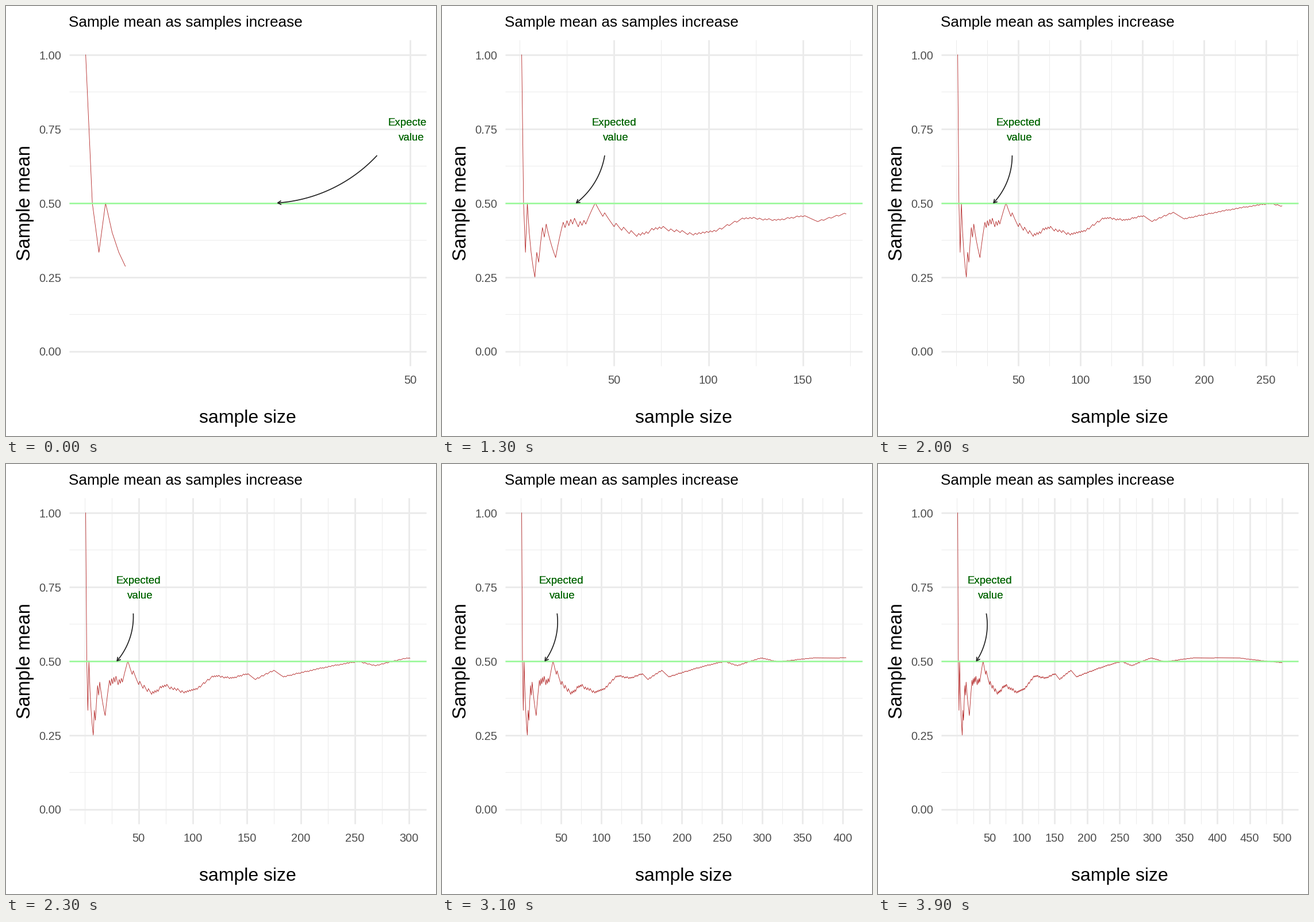
A matplotlib script that plays this animation: 748 by 748 pixels, repeating every 5 s.

```python
import matplotlib.pyplot as plt
import numpy as np
from matplotlib.animation import FuncAnimation
from matplotlib.collections import LineCollection
from matplotlib.patches import Rectangle

SIZE, DPI = 748, 64
PT = 72 / DPI  # points per pixel
LEFT, RIGHT, TOP, BOTTOM = 110, 731.2, 58.7, 626.3
X_FIRST, X_SPAN = 138.6, 564.5
STEPS, FRAMES, SAMPLES = 40, 50, 500

plt.rcParams["font.family"] = "Liberation Sans"

# Main turning points of the coin tosses: (tosses, heads)
TURNS = [(0, 0), (1, 1), (3, 1), (4, 2), (8, 2), (14, 6), (19, 6), (23, 10),
         (35, 15), (40, 20), (49, 21), (64, 25), (74, 31), (91, 36),
         (104, 42), (120, 54), (136, 60), (151, 69), (158, 69), (175, 82),
         (184, 82), (200, 92), (253, 126), (269, 130), (298, 152),
         (320, 159), (363, 185), (431, 220), (500, 247)]


def running_mean():
    """Whole heads spread evenly between turning points, per toss."""
    tosses = np.arange(1, SAMPLES + 1)
    heads = np.floor(np.interp(tosses, *np.transpose(TURNS)) + 0.5)
    return heads / tosses


def y_px(value):
    return 600.5 - 516 * np.asarray(value)


MEANS_PX = y_px(running_mean())

fig = plt.figure(figsize=(SIZE / DPI, SIZE / DPI), dpi=DPI, facecolor="white")
ax = fig.add_axes([0, 0, 1, 1])
ax.set_xlim(0, SIZE)
ax.set_ylim(SIZE, 0)
ax.axis("off")
panel = Rectangle((LEFT, TOP), RIGHT - LEFT, BOTTOM - TOP,
                  transform=ax.transData)


def label(x, y, text, size, color="black", **kw):
    kw.setdefault("ha", "center")
    return ax.text(x, y, text, size=size * PT, color=color, va="baseline",
                   rotation_mode="anchor", **kw)


def note(y, text):
    item = label(0, y, text, 18.6, "#006400", zorder=6)
    item.set_clip_on(True)
    item.set_clip_path(panel)
    return item


def stroke(color, width, zorder):
    return ax.plot([], [], color=color, lw=width * PT, zorder=zorder,
                   solid_capstyle="butt", solid_joinstyle="round")[0]


def grid(width, zorder):
    lines = LineCollection([], colors="#EBEBEB", linewidths=width * PT,
                           zorder=zorder)
    return ax.add_collection(lines, autolim=False)


def rows(values):
    return [[(LEFT, y), (RIGHT, y)] for y in y_px(values)]


def columns(xs):
    return [[(x, TOP), (x, BOTTOM)] for x in xs]


label(109.5, 36, "Sample mean as samples increase", 26.1, ha="left")
label(420.3, 725, "sample size", 32)
label(42.3, 342.3, "Sample mean", 32.5, rotation=90)
MAJOR_Y = np.arange(5) / 4
for value in MAJOR_Y:
    label(96, y_px(value) + 8, f"{value:.2f}", 20, "#4D4D4D", ha="right")

minor_grid, major_grid = grid(1, 1), grid(3, 2)
mean_line = stroke("#B22222", 0.85, 3)
expected_line = stroke("#98FB98", 2.5, 4)
expected_line.set_data([LEFT, RIGHT], [y_px(0.5)] * 2)
arrow, arrow_head = stroke("#222222", 1.7, 5), stroke("#222222", 1.7, 5)
ticks = [label(0, 657, str(n), 20, "#4D4D4D") for n in range(50, 501, 50)]
# Overprinting gives the note its heavier weight
upper_notes = [note(208, "Expected") for _ in range(2)]
lower_notes = [note(234, "value") for _ in range(2)]


def draw_arrow(start, end, bulge=0.19, barb=7):
    start, end = np.array(start), np.array(end)
    half = np.hypot(*(end - start)) / 2
    along = (end - start) / (2 * half)
    across = np.array([along[1], -along[0]])
    phi = 2 * np.arctan(bulge)
    a = np.linspace(-phi, phi, 40)[:, None]
    arc = (start + end) / 2 + half / np.sin(phi) * (
        along * np.sin(a) + across * (np.cos(a) - np.cos(phi)))
    arrow.set_data(*arc.T)
    back = across * np.sin(phi) - along * np.cos(phi)
    heading = np.arctan2(back[1], back[0])
    barbs = [end + barb * np.array([np.cos(t), np.sin(t)])
             for t in (heading - np.pi / 6, heading + np.pi / 6)]
    arrow_head.set_data(*np.transpose([barbs[0], end, barbs[1]]))


def update(frame):
    step = min(frame, STEPS - 1)
    count = min(int(1 + (SAMPLES - 1) / (STEPS - 1) * (step + 0.5)), SAMPLES)
    x_max = max(count, 50)

    def x_px(n):
        return X_FIRST + (np.asarray(n) - 1) * X_SPAN / (x_max - 1)

    edge = x_max + 0.05 * (x_max - 1)
    major = np.arange(50, min(edge, SAMPLES) + 1e-9, 50)
    minor = [0, *np.arange(25, edge, 50)] if len(major) > 1 else []
    major_grid.set_segments(rows(MAJOR_Y) + columns(x_px(major)))
    minor_grid.set_segments(rows(MAJOR_Y[:-1] + 0.125) + columns(x_px(minor)))
    for i, tick in enumerate(ticks):
        tick.set_visible(i < len(major))
        tick.set_x(x_px(50 * (i + 1)))

    mean_line.set_data(x_px(np.arange(1, count + 1)), MEANS_PX[:count])
    draw_arrow((x_px(45), y_px(0.66)), (x_px(30), y_px(0.5)))
    for upper, lower in zip(upper_notes, lower_notes):
        upper.set_x(x_px(50))
        lower.set_x(x_px(50) + 2.5)
    return []


anim = FuncAnimation(fig, update, frames=FRAMES, interval=100,
                     repeat=True, repeat_delay=0, blit=False)
plt.show()
```
